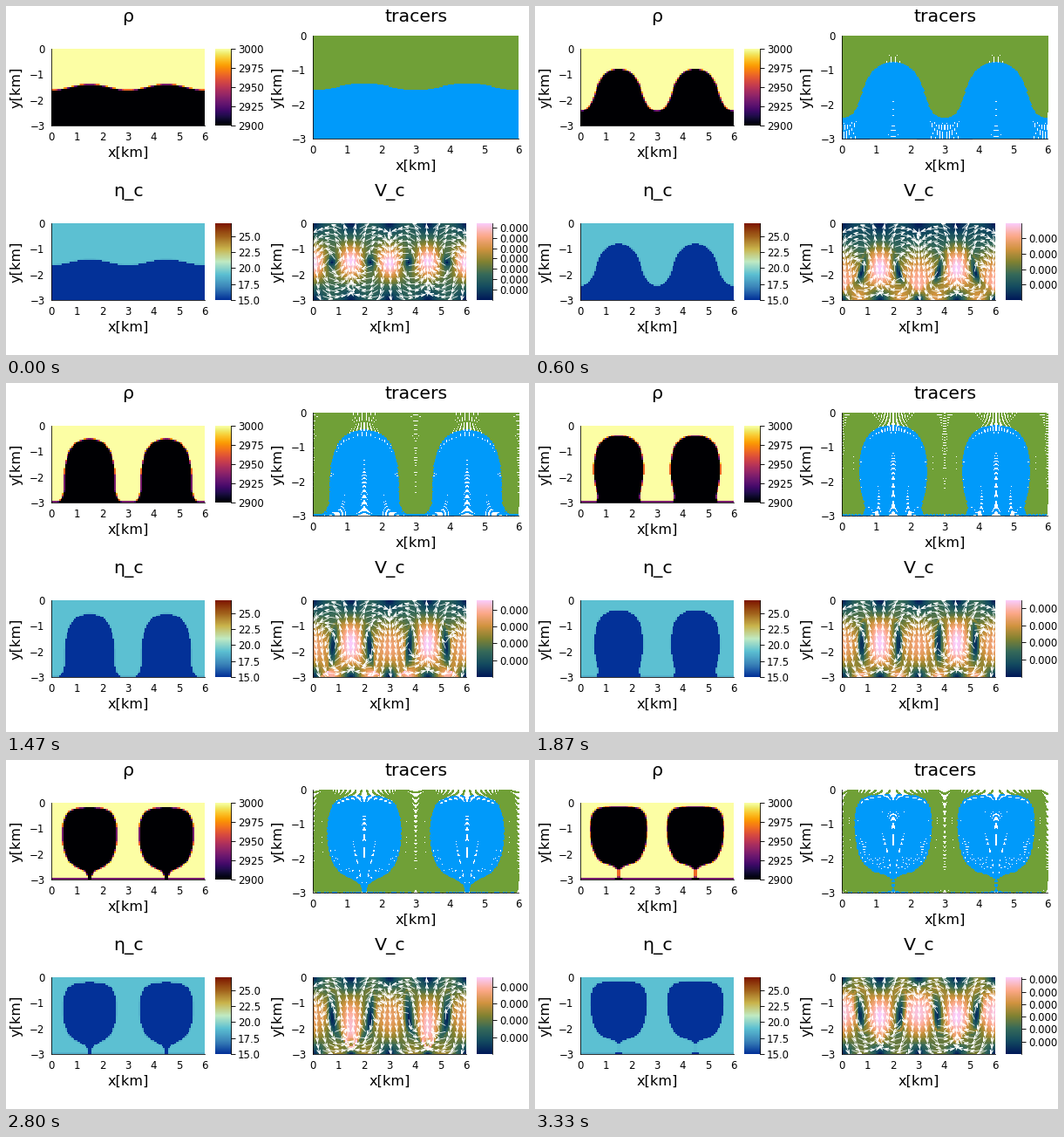
A matplotlib script for the animation above (3400 ms loop, 600 by 400 pixels).

```python
import numpy as np
import matplotlib.pyplot as plt
from matplotlib.animation import FuncAnimation
from matplotlib.collections import LineCollection
from matplotlib.colors import LinearSegmentedColormap
from matplotlib.path import Path

W, H, DPI = 600, 400, 100
FRAMES, LOOP = 51, 3400
PT = 72 / DPI  # points per pixel
plt.rcParams["font.family"] = "DejaVu Sans"

# Half of one period (1.5 km x 3 km) is simulated, the rest is mirrored
NX, NY, SUB = 25, 50, 3
CELL = 1.5 / NX
SUBSTEPS = 2
LOG_HEAVY, LOG_LIGHT = 19, 15
CONTRAST = 10.0 ** (LOG_HEAVY - LOG_LIGHT)
FILM = -2.97

# Pace: square root of the rise of the light fluid's centre of mass
PACE_FRAMES = [0, 9, 17, 28, 36, 42, 50]
PACE_RISE = [.041, .369, .515, .704, .852, .91, .979]

node = np.arange((NY + 1) * (NX + 1)).reshape(NY + 1, NX + 1)
unknowns = (NY - 1) * (NX - 1)
number = np.full(node.shape, unknowns)  # all boundary nodes share one dummy
number[1:-1, 1:-1] = np.arange(unknowns).reshape(NY - 1, NX - 1)


def pairs(*parts):
    idx = np.stack([p.ravel() for p in parts], axis=1)
    return (idx[:, :, None] * (unknowns + 1) + idx[:, None, :]).ravel()


stretch_w = np.array([-1, -1, 1, 1.0])
shear_w = np.array([2, 2, -2, -2.0])
entry = np.concatenate([
    pairs(number[1:-1, 2:], number[1:-1, :-2],
          number[2:, 1:-1], number[:-2, 1:-1]),
    pairs(number[1:, 1:], number[:-1, :-1],
          number[1:, :-1], number[:-1, 1:]),
])


def lattice(step):
    xs = np.arange(step / 2, 1.5, step)
    ys = np.arange(step / 2, 3, step) - 3
    return np.column_stack([g.ravel() for g in np.meshgrid(xs, ys)])


samples = lattice(CELL / SUB)


def heavy_fraction(chain):
    path = Path(np.vstack([chain, (1.6, chain[-1, 1]), (1.6, -3.1),
                           (-.1, -3.1), (-.1, chain[0, 1])]))
    light = path.contains_points(samples).reshape(NY, SUB, NX, SUB)
    return 1 - light.mean(axis=(1, 3))


def solve_blocks(a, b, m):
    """Solve a block tridiagonal system with blocks of size m."""
    cuts = [slice(i, i + m) for i in range(0, len(b), m)]
    gains, parts = [], []
    for k, s in enumerate(cuts):
        diag, r = a[s, s], b[s]
        if k:
            low = a[s, cuts[k - 1]]
            diag, r = diag - low @ gains[-1], r - low @ parts[-1]
        up = a[s, cuts[k + 1]] if k + 1 < len(cuts) else np.zeros((len(r), 0))
        sol = np.linalg.solve(diag, np.column_stack([up, r]))
        gains.append(sol[:, :-1])
        parts.append(sol[:, -1])
    out = [parts[-1]]
    for g, p in zip(gains[-2::-1], parts[-2::-1]):
        out.append(p - g @ out[-1])
    return np.concatenate(out[::-1])


def corners(a):
    return a[1:, 1:], a[:-1, 1:], a[1:, :-1], a[:-1, :-1]


def flow(f):
    """Stokes flow from a stream function: u and v on the cell faces."""
    eta = 1 + (CONTRAST - 1) * f
    eta_node = sum(corners(eta)) / 4
    values = np.concatenate([
        np.outer(eta_node.ravel(), np.outer(stretch_w, stretch_w)).ravel(),
        np.outer(eta.ravel(), np.outer(shear_w, shear_w)).ravel(),
    ])
    a = np.bincount(entry, values, (unknowns + 1) ** 2)
    a = a.reshape(unknowns + 1, -1)[:unknowns, :unknowns]
    ne, se, nw, sw = corners(f)
    psi = np.zeros(node.shape)
    force = (nw + sw - ne - se).ravel() * CONTRAST
    psi[1:-1, 1:-1] = solve_blocks(a, force, 2 * (NX - 1)).reshape(NY - 1, -1)
    return np.diff(psi, axis=0), -np.diff(psi, axis=1)


def centred(u, v):
    return (u[:, 1:] + u[:, :-1]) / 2, (v[1:] + v[:-1]) / 2


def bilinear(grid, gx, gy):
    rows, cols = grid.shape
    gx, gy = np.clip(gx, 0, cols - 1), np.clip(gy, 0, rows - 1)
    i = np.minimum(gx.astype(int), cols - 2)
    j = np.minimum(gy.astype(int), rows - 2)
    s, t = gx - i, gy - j
    return ((grid[j, i] * (1 - s) + grid[j, i + 1] * s) * (1 - t)
            + (grid[j + 1, i] * (1 - s) + grid[j + 1, i + 1] * s) * t)


def advect(pts, u, v, dt, floor):
    gx, gy = pts[:, 0] / CELL, (pts[:, 1] + 3) / CELL
    move = np.column_stack([bilinear(u, gx, gy - .5), bilinear(v, gx - .5, gy)])
    return np.clip(pts + dt * move, (0, floor), (1.5, 0))


def light_height(chain):
    x, y = chain.T
    def integral(g):
        return np.sum((g[1:] + g[:-1]) / 2 * np.diff(x))
    return integral((y ** 2 - 9) / 2) / integral(y + 3)


def wave(x):
    return -1.5 - .1 * np.cos(2 * np.pi * x / 3)


tracers = lattice(CELL / 2)
is_light = tracers[:, 1] < wave(tracers[:, 0])


def simulate():
    xs = np.linspace(0, 1.5, 260)
    chain, pts = np.column_stack([xs, wave(xs)]), tracers
    for n in range(FRAMES):
        for k in range(SUBSTEPS):
            f = heavy_fraction(chain)
            u, v = flow(f)
            uc, vc = centred(u, v)
            if k == 0:
                yield f, uc, vc, pts
            rise = np.interp(n + (k + 1) / SUBSTEPS, PACE_FRAMES, PACE_RISE)
            rate = np.average(vc, weights=1 - f)
            dt = (rise ** 2 - 2.25 - light_height(chain)) / rate
            dt = np.clip(dt, 0, .08 / np.hypot(uc, vc).max())
            chain = advect(chain, u, v, dt, FILM)
            pts = advect(pts, u, v, dt, -3)


states = list(simulate())


def unfold(a, sign=1):
    return np.tile(np.hstack([a, sign * a[:, ::-1]]), 2)


def unfold_points(pts):
    x, y = pts.T
    return np.concatenate([x, 3 - x, 3 + x, 6 - x]), np.tile(y, 4)


# Figure
def ramp(name, colours):
    return LinearSegmentedColormap.from_list(name, colours.split())


batlow = ramp("navy_pink",
              "#011959 #134b60 #366a59 #828231 #d0933f #fca888 #faccfa")
roma = ramp("blue_brown",
            "#033198 #3b84b9 #5cc0d2 #c0eac3 #c9b44c #a1611b #7e1700")
BLUE, GREEN = "#009afa", "#70a037"

fig = plt.figure(figsize=(W / DPI, H / DPI), dpi=DPI, facecolor="white")


def box(x, y, w, h):
    return fig.add_axes([x / W, 1 - (y + h) / H, w / W, h / H])


def label(x, y, text, px, **kw):
    fig.text(x / W, 1 - y / H, text, fontsize=px * PT, ha="center", **kw)


def show_spines(ax, *sides):
    for side, spine in ax.spines.items():
        spine.set_visible(side in sides)
        spine.set_linewidth(.8 * PT)


def panel(x, y, w, h, title, title_x, title_y):
    ax = box(x, y, w, h)
    ax.set(xlim=(0, 6), ylim=(-3, 0), xticks=range(7), yticks=[0, -1, -2, -3])
    ax.tick_params(length=0, pad=7.4 * PT, labelsize=11.7 * PT)
    show_spines(ax, "left", "bottom")
    label(title_x, title_y, title, 20.5)
    label(x + w / 2 + .5, y + h + 36, "x[km]", 16.1)
    label(x - 39.5, y + h / 2, "y[km]", 16.1, rotation=90, va="center")
    return ax


def heat(ax, cmap, lo, hi):
    return ax.imshow(np.zeros((NY, 4 * NX)), cmap=cmap, vmin=lo, vmax=hi,
                     origin="lower", extent=(0, 6, -3, 0), aspect="auto",
                     interpolation="nearest")


def colorbar(x, y, cmap, lo, hi, ticks, fmt):
    ax = box(x, y, 18, 88)
    ax.imshow(np.linspace(0, 1, 256)[:, None], cmap=cmap, origin="lower",
              extent=(0, 1, lo, hi), aspect="auto")
    ax.set_xticks([])
    ax.yaxis.tick_right()
    ax.set_yticks(ticks, [fmt % t for t in ticks])
    ax.tick_params(length=5 * PT, width=.9 * PT, pad=3 * PT, labelsize=11.7 * PT)
    show_spines(ax, "right")
    return ax


rho_ax = panel(52, 49, 176, 88, "ρ", 140, 18)
tracer_ax = panel(352, 34, 236, 118, "tracers", 471, 18)
eta_ax = panel(52, 249, 176, 88, "η_c", 140, 218)
speed_ax = panel(352, 249, 176, 88, "V_c", 441, 218)

rho_im = heat(rho_ax, "inferno", 2900, 3000)
eta_im = heat(eta_ax, roma, 15, 27)
speed_im = heat(speed_ax, batlow, 0, 1)
colorbar(240, 49, "inferno", 2900, 3000, range(2900, 3001, 25), "%d")
colorbar(240, 249, roma, 15, 27, np.arange(15, 26, 2.5), "%.1f")
speed_bar = colorbar(540, 249, batlow, 0, 1, [], "%.3f")

heavy_dots, light_dots = [
    tracer_ax.plot([], [], "s", ms=2 * PT, mew=0, color=c)[0]
    for c in (GREEN, BLUE)]

PICK = slice(2, None, 4)
grid_x, grid_y = np.meshgrid((np.arange(4 * NX) + .5) * CELL,
                             (np.arange(NY) + .5) * CELL - 3)
tails = (grid_x + 1j * grid_y)[PICK, PICK].ravel()
arrows = LineCollection([], colors="white", linewidths=.75 * PT)
speed_ax.add_collection(arrows, autolim=False)


def arrow_lines(u, v):
    """Arrows of equal length with open heads."""
    way = (u + 1j * v)[PICK, PICK].ravel()
    way = way / (np.abs(way) + 1e-30)
    tips = tails + .4 * way
    left, right = [tips - .16 * way * np.exp(1j * a) for a in (.35, -.35)]
    z = np.stack([tails, tips, left, tips, right], axis=1)
    return np.stack([z.real, z.imag], axis=2)


def peak_speed(u, v):
    return np.percentile(np.hypot(u, v), 99.8)


STEPS = np.outer(10.0 ** np.arange(-3, 4), (1, 2, 5)).ravel()
FIRST_PEAK = peak_speed(*states[0][1:3])


def draw(n):
    f, u, v, pts = states[n]
    rho_im.set_data(unfold(2900 + 100 * f))
    eta_im.set_data(unfold(LOG_LIGHT + np.log10(1 + (CONTRAST - 1) * f)))
    heavy_dots.set_data(*unfold_points(pts[~is_light]))
    light_dots.set_data(*unfold_points(pts[is_light]))

    top = peak_speed(u, v)
    u, v = unfold(u, -1), unfold(v)
    speed_im.set_data(np.hypot(u, v) / top)
    arrows.set_segments(arrow_lines(u, v))

    peak = .74 * top / FIRST_PEAK
    step = STEPS[np.argmax(peak / STEPS < 8)]
    ticks = np.arange(step, peak, step) / peak
    speed_bar.set_yticks(ticks, ["0.000"] * len(ticks))
    return []


anim = FuncAnimation(fig, draw, frames=FRAMES, interval=LOOP / FRAMES,
                     repeat=True, repeat_delay=0, blit=False)
plt.show()
```
